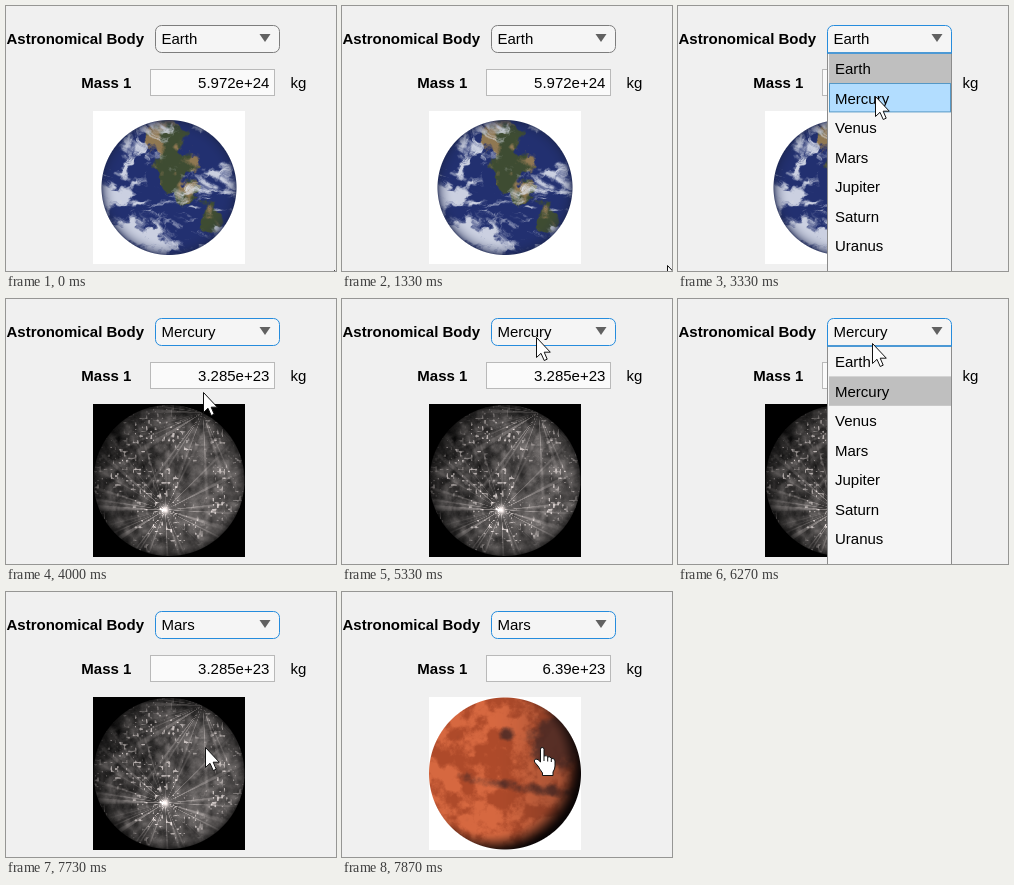
These frames come from a looping animation (330 by 265 pixels, 8 s). An HTML page with a canvas:

```html
<!DOCTYPE html>
<html lang="en">
<head>
<meta charset="utf-8">
<title>Astronomical body picker</title>
<style>
  html, body { margin: 0; width: 100%; height: 100%; overflow: hidden; background: #f0f0f0; }
  canvas { position: absolute; left: 87px; top: 105px; }
  svg { position: absolute; left: 0; top: 0; }
  text { font: 15px Arial, "Liberation Sans", sans-serif; fill: #000; }
  .label { font-weight: bold; text-anchor: end; }
</style>
</head>
<body>
<svg width="330" height="265" viewBox="0 0 330 265">
  <text class="label" x="138" y="38">Astronomical Body</text>
  <text class="label" x="125.4" y="82">Mass 1</text>
  <rect x="144.5" y="63.5" width="124" height="26" fill="#fafafa" stroke="#b9b9b9"/>
  <text id="mass" x="263.4" y="82" text-anchor="end"></text>
  <text x="284.5" y="82">kg</text>
  <rect id="box" x="149.5" y="19.5" width="124" rx="6" fill="#f5f5f5"/>
  <text id="choice" x="155.4" y="38"></text>
  <path d="M253.5 28H264.5L259 36Z" fill="#616161"/>
  <g id="menu">
    <path d="M149.5 47V270H273.5V47Z" fill="#f5f5f5" stroke="#8c8c8c"/>
    <path d="M149 47H274" stroke="#268cdd" stroke-width="1.5"/>
    <rect id="chosen" x="151" width="122" height="29.4" fill="#bfbfbf"/>
    <rect id="hover" x="151.5" width="121" height="28.4" fill="#b2ddff" stroke="#5598c6"/>
  </g>
  <g id="cursor" stroke="#111" stroke-linejoin="round" fill="#fff">
    <path id="arrow" d="M.5 .5V20.5L5 16.3L8.2 23.5L11.2 22.2L8.2 15.2H14.3Z"/>
    <g id="hand" transform="translate(-7.5 0)">
      <path d="M7 2.2Q7 .5 8.7 .5Q10.5 .5 10.5 2.2V9Q13.5 7.8 14.2 10Q17 9 17.8 11.4Q21.5 11 21.5 14V19Q21.5 22 19.5 25V28.5H9V26Q6.5 22.5 4.5 19L1 15Q0 12.3 2.5 12Q4.5 12 7 15Z"/>
      <path d="M10.5 9V14M14.2 10V14.5M17.8 11.4V15" fill="none"/>
    </g>
  </g>
</svg>
<script>
const LOOP = 8000, STEP = 66.4, ROW = 29.4, MENU_TOP = 48;
const NAMES = ['Earth', 'Mercury', 'Venus', 'Mars', 'Jupiter', 'Saturn', 'Uranus', 'Neptune'];
const PICKS = [
  { row: 0, mass: '5.972e+24' },
  { row: 1, mass: '3.285e+23' },
  { row: 3, mass: '6.39e+23' }
];
const MOVES = [
  { start: 1330, steps: 12, to: [198, 32] },
  { start: 2870, steps: 8, to: [197, 93] },
  { start: 4930, steps: 7, to: [194, 38] },
  { start: 6200, steps: 15, to: [199, 155] }
];
const $ = id => document.getElementById(id);

const ramp = (lo, hi, x) => {
  const p = Math.min(1, Math.max(0, (x - lo) / (hi - lo)));
  return p * p * (3 - 2 * p);
};
const lerp = (a, b, k) => a + (b - a) * k;
const mix = (a, b, k) => a.map((v, i) => lerp(v, b[i], k));
const near = (u, v, x, y, r) => Math.exp(-((u - x) ** 2 + (v - y) ** 2) / (r * r));

function hash(x, y) {
  const s = Math.sin(x * 127.1 + y * 311.7) * 43758.5453;
  return s - Math.floor(s);
}

function noise(x, y) {
  const i = Math.floor(x), j = Math.floor(y);
  const a = ramp(0, 1, x - i), b = ramp(0, 1, y - j);
  return lerp(lerp(hash(i, j), hash(i + 1, j), a),
    lerp(hash(i, j + 1), hash(i + 1, j + 1), a), b);
}

// Layered noise, each layer twice as fine and half as strong.
function cloudy(x, y) {
  let sum = 0;
  for (let k = 0; k < 5; k++) sum += noise(x * 2 ** k + k * 17, y * 2 ** k) / 2 ** (k + 1);
  return sum / (1 - 1 / 32);
}

function earth(u, v, z) {
  const main = near(u, v, .07, -.25, .36);
  const shore = cloudy(u * 5, v * 5 + 20) - .5;
  const shape = Math.max(main, near(u, v, .2, .1, .15),
    near(u, v, .64, .46, .2), near(u, v, -.05, -.72, .35));
  const land = ramp(.4, .56, shape + shore * 1.2);
  const soil = mix([62, 76, 50], [144, 120, 82], ramp(.38, .6, cloudy(u * 5 + 40, v * 5) - u * .3));
  const swirl = cloudy(u * 2.5 + 7, v * 2.5);
  const cover = cloudy(u * 3.5 + swirl * 3, v * 6 + swirl * 3)
    + .09 * ramp(.2, -.5, u) + .05 * ramp(.1, .6, v) - .12 * main;
  const ground = mix([34, 48, 112], soil, land);
  const sky = mix(ground, [226, 230, 240], .88 * ramp(.5, .74, cover));
  return mix([28, 38, 80], sky, ramp(-.15, .65, z));
}

function rays(u, v, x, y) {
  const a = Math.atan2(v - y, u - x), d = Math.hypot(u - x, v - y);
  return ramp(.55, .95, noise(Math.cos(a) * 20 + 50, Math.sin(a) * 20)) * Math.exp(-d * 1.3);
}

function mercury(u, v, z) {
  const streaks = rays(u, v, -.05, .39) + rays(u, v, .45, -.9);
  const craters = ramp(.68, .95, noise(u * 34 + 9, v * 34)) * ramp(.35, .65, cloudy(u * 3, v * 3 + 60));
  const grain = cloudy(u * 9 + 30, v * 9) - .5;
  const tone = 74 + 24 * u + 14 * v + 110 * grain + 75 * streaks + 110 * craters
    + 170 * near(u, v, -.05, .39, .06);
  const g = tone * lerp(.4, 1, ramp(0, .75, z));
  return [g * 1.02, g * .98, g * .97];
}

function mars(u, v) {
  const bend = (cloudy(u * 4, v * 4 + 80) - .5) * 1.1;
  const band = Math.exp(-(((v - .15 - u * .12) / .12) ** 2)) * ramp(-.8, -.5, u);
  const patch = Math.max(band * .62, near(u, v, .68, -.45, .45), near(u, v, .03, -.53, .14) * .7);
  const dust = mix([174, 74, 42], [214, 104, 64], ramp(.35, .65, cloudy(u * 6, v * 6 + 10)));
  const face = mix(dust, [74, 42, 38], .85 * ramp(.3, .8, patch + bend));
  const dusk = ramp(-.2, .9, u) * .35;
  return mix(mix(face, [70, 36, 28], dusk), [10, 5, 5], ramp(.9, 1.2, Math.hypot(u + .17, v + .13)));
}

// A square picture with one disc, coloured point by point.
function picture(back, radius, shade) {
  const canvas = document.createElement('canvas');
  const w = canvas.width = 152, h = canvas.height = 153;
  const c = canvas.getContext('2d');
  const image = c.createImageData(w, h);
  for (let y = 0; y < h; y++) for (let x = 0; x < w; x++) {
    const u = (x + .5 - w / 2) / radius, v = (y + .5 - h / 2) / radius;
    const d = Math.hypot(u, v), edge = Math.min(1, (1 - d) * radius + .5);
    const ground = [back, back, back];
    const color = edge > 0
      ? mix(ground, shade(u, v, Math.sqrt(Math.max(0, 1 - d * d))), edge)
      : ground;
    image.data.set([...color, 255], (y * w + x) * 4);
  }
  c.putImageData(image, 0, 0);
  document.body.insertBefore(canvas, document.querySelector('svg'));
  return canvas;
}

const pictures = [
  picture(255, 67.5, earth),
  picture(0, 75.5, mercury),
  picture(255, 76, mars)
];

NAMES.forEach((name, i) => {
  const item = document.createElementNS('http://www.w3.org/2000/svg', 'text');
  item.setAttribute('x', 157);
  item.setAttribute('y', Math.round(68 + i * 29.5));
  item.textContent = name;
  $('menu').append(item);
});

function cursorAt(t) {
  let at = [328, 264];
  for (const { start, steps, to } of MOVES) {
    if (t < start) break;
    at = mix(at, to, ramp(0, steps, Math.floor((t - start) / STEP) + 1));
  }
  return at.map(Math.round);
}

const stage = (t, second, third) => (t >= second) + (t >= third);
const show = (el, on) => { el.style.display = on ? '' : 'none'; };

function render(t) {
  const open = (t >= 2470 && t < 3800) || (t >= 5730 && t < 7730);
  const { row } = PICKS[stage(t, 3800, 7730)];
  const [x, y] = cursorAt(t);

  $('choice').textContent = NAMES[row];
  $('mass').textContent = PICKS[stage(t, 3870, 7800)].mass;
  const shown = stage(t, 4000, 7870);
  pictures.forEach((p, i) => show(p, i === shown));

  // The open menu hides the lower end of the taller box.
  $('box').setAttribute('height', open ? 40 : 27);
  $('box').setAttribute('stroke', t >= 2470 ? '#268cdd' : '#7d7d7d');

  show($('menu'), open);
  const over = Math.floor((y - MENU_TOP) / ROW);
  $('chosen').setAttribute('y', MENU_TOP + row * ROW);
  show($('hover'), over >= 0 && over !== row);
  $('hover').setAttribute('y', Math.round(MENU_TOP + over * ROW) + .5);

  const pointing = t >= 7800;
  show($('arrow'), !pointing);
  show($('hand'), pointing);
  $('cursor').setAttribute('transform', `translate(${x} ${y})`);
}

const began = performance.now();
function tick() {
  render((performance.now() - began) % LOOP);
  requestAnimationFrame(tick);
}
tick();
</script>
</body>
</html>
```
